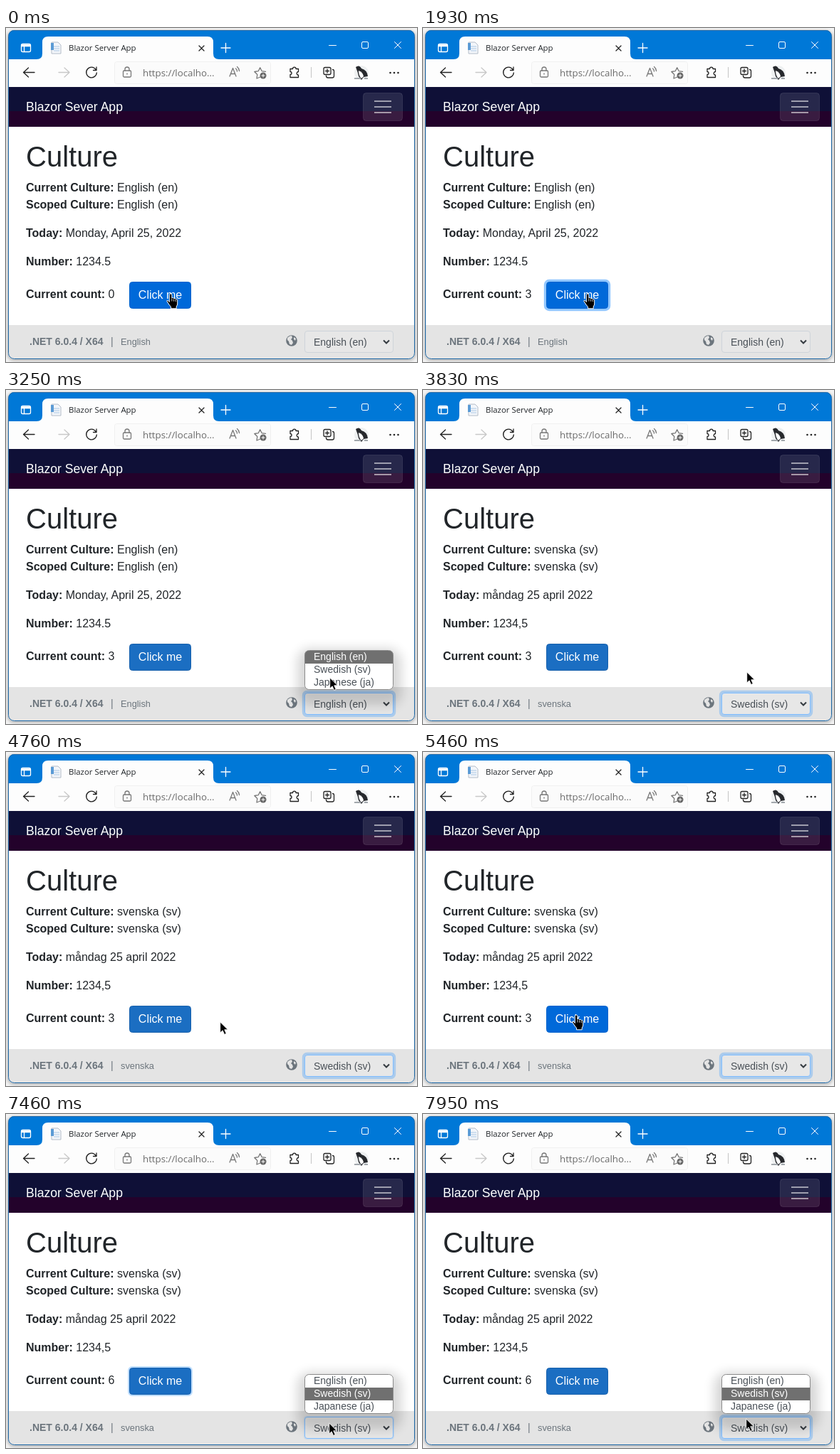
An HTML page that plays this animation: 577x470 px, repeating every 8 s.

```html
<!DOCTYPE html>
<html lang="en">
<head>
<meta charset="utf-8">
<title>Culture</title>
<style>
  html, body { margin: 0; width: 100%; height: 100%; overflow: hidden; background: #f4f4f4; }
  svg { display: block; }
  text { font: 16px "Liberation Sans", Arial, sans-serif; fill: #212529; }
  .b { font-weight: bold; }
  .ui { font-family: "Open Sans", "Noto Sans", sans-serif; }
  .line { fill: none; stroke: #222; stroke-width: 1.3; stroke-linecap: round; stroke-linejoin: round; }
  .soft { stroke: #777; }
  .white { stroke: #fff; }
  .foot text { font-size: 14px; fill: #6c757d; }
  .foot .culture { font-size: 12.8px; }
  .foot .choice, .list text { font-size: 14px; fill: #495057; }
  .list .on { fill: #fff; }
</style>
</head>
<body>
<svg width="577" height="470" viewBox="0 0 577 470">
  <defs>
    <clipPath id="frame"><rect x="3.5" y="3" width="570" height="463" rx="8"/></clipPath>
    <clipPath id="listClip"><rect x="419.5" y="366.5" width="124" height="55" rx="6"/></clipPath>
    <filter id="blur" x="-40%" y="-60%" width="180%" height="220%"><feGaussianBlur stdDeviation="8"/></filter>
    <filter id="edge"><feGaussianBlur stdDeviation="2.5"/></filter>
  </defs>

  <rect x="2" y="4" width="573" height="464" rx="9" opacity=".28" filter="url(#edge)"/>

  <g clip-path="url(#frame)">
    <rect width="577" height="470" fill="#fff"/>

    <!-- title bar -->
    <rect width="577" height="44" fill="#0078d7"/>
    <path d="M43 44q8 0 8-8V20q0-8 8-8h224q8 0 8 8v16q0 8 8 8z" fill="#fdfdfd"/>
    <g class="line white">
      <rect x="21.5" y="22.5" width="13" height="11" rx="2"/>
      <path d="M22 24h12M22 25.5h12M25.5 26v7" />
      <path d="M302 28h13M308.500 21.500v13" />
      <path d="M453.500 24.500h10M545.500 19.500l9 9M554.500 19.500l-9 9" stroke-width="1"/>
      <rect x="499.500" y="19.500" width="9" height="9" rx="1.500" stroke-width="1"/>
    </g>
    <path d="M64 20h9l4 4v12H64z" fill="#f3f6fa" stroke="#b3bcc8"/>
    <path d="M67 26h8M67 29h8M67 32h8" stroke="#a9c6e4"/>
    <rect x="63" y="21" width="4" height="10" fill="#5b9bd5"/>
    <text class="ui" x="88" y="32" style="font-size:11.4px">Blazor Server App</text>
    <path class="line" d="M271 25l7 7M278 25l-7 7"/>

    <!-- tool bar -->
    <rect y="44" width="577" height="39" fill="#fdfdfd"/>
    <rect x="152.500" y="47.500" width="219" height="31" rx="3" fill="#fbfbfb" stroke="#f0f0f0"/>
    <g class="line">
      <path d="M40 62.500H25M31.500 56l-7 6.500 7 6.500"/>
      <path d="M74 62.500h15M82 56l7 6.500-7 6.500" stroke="#c8c8c8"/>
      <path d="M126 58.300A7.300 7.300 0 1 0 127.300 63M127 55v4.500h-4.500"/>
      <path d="M399 57.500h3.500a2.300 2.300 0 1 1 4.600 0h3.400v4a2.300 2.300 0 1 0 0 4.600v3.400h-11.500v-4a2 2 0 1 0 0-4z"/>
      <rect x="446" y="55.500" width="10" height="10" rx="2"/>
      <path d="M449.500 68v-1M458.500 58.500a2 2 0 0 1 2 2v7a2.500 2.500 0 0 1-2.500 2.500h-6a2.500 2.500 0 0 1-2.500-2M451 58v5M448.500 60.500h5"/>
    </g>
    <g class="line soft">
      <rect x="164.500" y="60" width="11" height="9" rx="1.500"/>
      <path d="M167 60v-2a3 3 0 0 1 6 0v2M170 64v1"/>
      <path d="M314 68l4.500-11.500 4.500 11.500M315.500 64.500h6M322.500 57a5 5 0 0 1 2 4M324.500 54.500a8 8 0 0 1 3 6"/>
      <path d="M357 69l-5 2 .8-5.500-4-4 5.400-.8 2.500-5 2.500 5 5.300.7"/>
    </g>
    <circle cx="361" cy="67" r="4.500" fill="#666"/>
    <path d="M358.500 67h5M361 64.500v5" stroke="#fff"/>
    <path d="M428.500 55v15" stroke="#c4c4c4"/>
    <text class="ui" x="192" y="68" style="font-size:13.3px;fill:#6a6a6a">https://localho...</text>
    <circle cx="499" cy="63" r="10" fill="#eef0f1"/>
    <path d="M491 55q5-4 8 2 8 2 9 11l-6 1-3 4-4-5q-1-6-4-13z" fill="#27292d"/>
    <path d="M495 60q6 2 7 8l-3 3q-4-4-4-11z" fill="#fff"/>
    <path d="M489 71h9M503 71h5" stroke="#a2a8ad" stroke-width="2"/>
    <g fill="#222"><circle cx="539.500" cy="63" r="1.300"/><circle cx="545" cy="63" r="1.300"/><circle cx="550.500" cy="63" r="1.300"/></g>

    <!-- app bar -->
    <rect y="83" width="577" height="34" fill="#0f1037"/>
    <rect y="117" width="577" height="22" fill="#23022b"/>
    <text x="28" y="117" style="font-size:17.6px;fill:#fff">Blazor Sever App</text>
    <rect x="501.500" y="91.500" width="55" height="39" rx="4" fill="#fff" fill-opacity=".1" stroke="#fff" stroke-opacity=".1"/>
    <path d="M517 103h24M517 111h24M517 119h24" stroke="#fff" stroke-opacity=".55" stroke-width="1.800"/>

    <!-- page -->
    <text x="28" y="195" style="font-size:40px">Culture</text>
    <text x="28" y="230"><tspan class="b">Current Culture:</tspan> <tspan class="culture"></tspan></text>
    <text x="28" y="254"><tspan class="b">Scoped Culture:</tspan> <tspan class="culture"></tspan></text>
    <text x="28" y="294"><tspan class="b">Today:</tspan> <tspan id="today"></tspan></text>
    <text x="28" y="334"><tspan class="b">Number:</tspan> <tspan id="number"></tspan></text>
    <text x="28" y="380"><tspan class="b">Current count:</tspan> <tspan id="count"></tspan></text>
    <rect id="buttonRing" x="173" y="357" width="87" height="38" rx="4" fill="none" stroke="#92c7ff"/>
    <rect id="button" x="173.500" y="357.500" width="86" height="37" rx="4"/>
    <text x="216.500" y="381" text-anchor="middle" style="fill:#fff">Click me</text>

    <!-- footer -->
    <g class="foot">
      <rect y="418" width="577" height="50" fill="#e4e4e4"/>
      <text class="b" x="33" y="446">.NET 6.0.4 / X64</text>
      <text x="147" y="446">|</text>
      <text class="culture" id="language" x="161" y="446"></text>
      <circle cx="401" cy="440" r="7.800" fill="#6c757d"/>
      <path d="M395 436q3-3 6-3l1 3-2 2 2 2 1 3-2 3-3-1-1-4-2-2zM404 435l3 2-1 3-2-2z" fill="#e4e4e4"/>
      <rect id="selectRing" x="419" y="426" width="125" height="31" rx="3.500" fill="none" stroke="#abcbec"/>
      <rect id="select" x="419.500" y="426.500" width="124" height="30" rx="3.500" fill="#e7e7e7"/>
      <text class="choice" id="choice" x="432" y="447"></text>
      <path d="M530 439.500l4 4 4-4" fill="none" stroke="#343a40" stroke-width="2"/>
    </g>

    <!-- drop-down -->
    <g class="list" id="list">
      <rect x="409" y="364" width="146" height="80" rx="18" opacity=".16" filter="url(#blur)"/>
      <g clip-path="url(#listClip)">
        <rect x="419" y="366" width="125" height="56" fill="#fff"/>
        <rect id="mark" x="419" width="125" height="18" fill="#707070"/>
      </g>
      <text x="432" y="380">English (en)</text>
      <text x="432" y="398">Swedish (sv)</text>
      <text x="432" y="416">Japanese (ja)</text>
      <rect x="419.500" y="366.500" width="124" height="55" rx="6" fill="none" stroke="#8a8a8a"/>
    </g>
  </g>
  <rect x="3.500" y="3.500" width="570" height="462" rx="8" fill="none" stroke="#1c66a5"/>

  <g id="pointer">
    <path id="arrow" d="M.7 1v15l3.400-3.200 2.500 5.700 2.700-1.200-2.500-5.500h4.700z" stroke="#fff" stroke-width=".9"/>
    <g id="hand" transform="translate(-7 -1)">
      <path d="M5.300 12.500V2.700a1.800 1.800 0 0 1 3.600 0V7a1.700 1.700 0 0 1 2.900.8 1.700 1.700 0 0 1 2.600.8 1.600 1.600 0 0 1 2.300 1.400v5q0 2-1.500 4v2.800H7.500v-2.500q-2-2-4-5.300-2.200-2.700-1.500-3.600 1.300-1.300 3.300 2.100z" stroke="#fff"/>
      <path d="M8.900 7.500v4M11.700 8.500v3.300M14.300 9.200v2.800" stroke="#fff" stroke-width=".8"/>
    </g>
  </g>
</svg>
<script>
  const LOOP = 8000;
  const $ = id => document.getElementById(id);
  const cultures = document.querySelectorAll('tspan.culture');
  const options = document.querySelectorAll('#list text');

  const english = { name: 'English', code: 'en', option: 'English (en)', today: 'Monday, April 25, 2022', number: '1234.5' };
  const swedish = { name: 'svenska', code: 'sv', option: 'Swedish (sv)', today: 'måndag 25 april 2022', number: '1234,5' };

  // [time, value] pairs; each value holds until the next time
  const counts = [[0, 0], [960, 1], [1460, 2], [1930, 3], [5520, 4], [6000, 5], [6490, 6]];
  const buttonFocus = [[0, 0], [910, .35], [960, .7], [1010, 1], [2740, .4], [2800, 0],
    [5520, .35], [5610, .7], [5700, 1], [7460, .6], [7520, .3], [7580, 0]];
  const selectFocus = [[0, 0], [2740, .4], [2800, 1], [5520, .6], [5610, .3], [5700, 0],
    [7460, .4], [7520, .7], [7580, 1]];
  const buttonHot = [[0, 1], [2740, 0], [5460, 1], [7460, 0]];
  const listOpen = [[0, 0], [2740, 1], [3830, 0], [7460, 1]];

  // pointer moves: start, end, number of steps, destination
  const moves = [
    [2110, 2560, 9, 453, 431],
    [3070, 3430, 7, 454, 396],
    [4580, 5060, 9, 215, 370],
    [6850, 7300, 9, 453, 434],
    [7950, 7950, 1, 453, 428]
  ];

  const at = (track, t) => track.filter(key => key[0] <= t).pop()[1];

  function pointerAt(t) {
    let x = 231, y = 374;
    for (const [start, end, steps, toX, toY] of moves) {
      if (t < start) break;
      const step = t >= end ? steps : 1 + Math.floor((t - start) / (end - start) * (steps - 1));
      const p = Math.sin(step / steps * Math.PI / 2);
      x += (toX - x) * p;
      y += (toY - y) * p;
    }
    return [Math.round(x), Math.round(y)];
  }

  function setText(node, value) {
    if (node.textContent !== String(value)) node.textContent = value;
  }

  function show(node, visible) {
    node.setAttribute('display', visible ? 'inline' : 'none');
  }

  function setRing(id, level) {
    $(id).setAttribute('stroke-width', 6.4 * level);
    $(id).setAttribute('opacity', level);
  }

  function draw(t) {
    const culture = t < 3830 ? english : swedish;
    cultures.forEach(node => setText(node, `${culture.name} (${culture.code})`));
    setText($('language'), culture.name);
    setText($('choice'), culture.option);
    setText($('today'), culture.today);
    setText($('number'), culture.number);
    setText($('count'), at(counts, t));

    const hot = at(buttonHot, t);
    $('button').setAttribute('fill', hot ? '#0069d9' : '#1b6ec2');
    $('button').setAttribute('stroke', hot ? '#0062cc' : '#1861ac');
    setRing('buttonRing', at(buttonFocus, t));
    setRing('selectRing', at(selectFocus, t));
    $('select').setAttribute('stroke', at(selectFocus, t) ? '#80bdff' : '#ced4da');

    const [x, y] = pointerAt(t);
    const overButton = x > 173 && x < 260 && y > 357 && y < 395;
    $('pointer').setAttribute('transform', `translate(${x} ${y})`);
    show($('hand'), overButton);
    show($('arrow'), !overButton);

    const marked = culture === swedish || y < 403 ? 1 : 0;
    show($('list'), at(listOpen, t));
    $('mark').setAttribute('y', 367 + 18 * marked);
    options.forEach((node, i) => node.setAttribute('class', i === marked ? 'on' : ''));
  }

  function tick() {
    draw(performance.now() % LOOP);
    requestAnimationFrame(tick);
  }
  tick();
</script>
</body>
</html>
```
